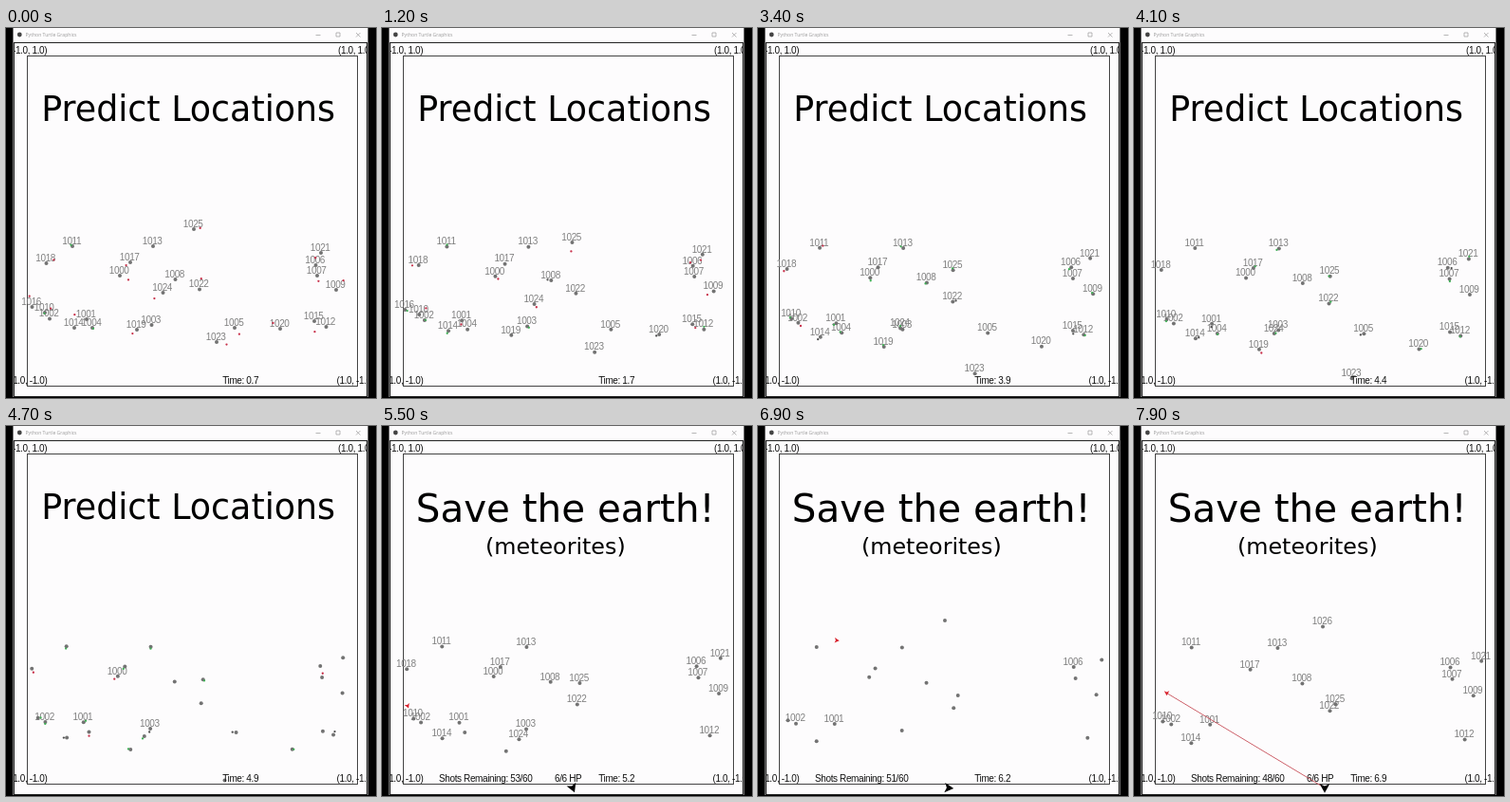
Animation of 390 by 390 pixels, one loop 8 s. Source, as an HTML page:

```html
<!DOCTYPE html>
<html lang="en">
<head>
<meta charset="utf-8">
<title>Turtle meteorites</title>
<style>
html, body { margin: 0; width: 100%; height: 100%; overflow: hidden; background: #000; }
svg { display: block; width: 100vw; height: 100vh; }
text { font: 10px "Liberation Sans", Arial, sans-serif; letter-spacing: -.38px; fill: #111; }
.title text { font-family: "DejaVu Sans", Verdana, sans-serif; letter-spacing: 0; fill: #000; }
.bar text { font: 5.1px "Open Sans", sans-serif; letter-spacing: 0; fill: #999; }
.label { fill: #808080; text-anchor: middle; }
</style>
</head>
<body>
<svg viewBox="0 0 390 390">
  <defs><clipPath id="canvas"><rect x="9" y="15" width="371" height="374"/></clipPath></defs>
  <rect width="390" height="390" fill="#000"/>
  <rect x="7.5" width="374" height="389" fill="#fdfcfd"/>
  <g class="bar">
    <circle cx="14.3" cy="7" r="2.4" fill="#444"/>
    <text x="20.5" y="9">Python Turtle Graphics</text>
    <path d="M326.5 7.5h5M348 5h4v4h-4zM369 5l4.5 4.5M373.5 5l-4.5 4.5" fill="none" stroke="#999" stroke-width=".7"/>
  </g>
  <rect x="8.5" y="15.5" width="372" height="373" fill="none" stroke="#222"/>
  <rect x="22.5" y="29.5" width="348" height="348" fill="none" stroke="#444"/>
  <g clip-path="url(#canvas)">
    <text x="43.2" y="27.2" text-anchor="end">(-1.0, 1.0)</text>
    <text x="350" y="27.2">(1.0, 1.0)</text>
    <text x="43.4" y="375.3" text-anchor="end">(-1.0, -1.0)</text>
    <text x="348.5" y="375.3">(1.0, -1.0)</text>
    <g class="title" id="predict"><text x="37.3" y="97.8" style="font-size:36.4px">Predict Locations</text></g>
    <g class="title" id="save">
      <text x="35.8" y="101.4" style="font-size:40.4px">Save the earth!</text>
      <text x="109" y="135.4" style="font-size:23.8px">(meteorites)</text>
    </g>
    <g id="world"></g>
  </g>
</svg>
<script>
const LOOP = 8000, STEP = 100, SCENE2 = 49, FIRST = 1000;
const T0 = 0.7;              // game time of the first picture
const INTERVAL = 6;          // seconds between launches
const CENTER = [196.5, 203.5];
const GUN = [201, 381.5];
const el = id => document.getElementById(id);

// Where each meteorite is at T0; the launch rule below gives its speed.
const places = [
  [120,261], [85,307], [46,306.5], [153.5,313], [91,316], [241,316], [326.5,250], [328,261], [178.5,265],
  [348,276], [41,300], [70,230], [337.5,315], [155,230], [72,316], [325,309], [27.5,294], [131,247],
  [42.5,248], [138,318], [289,317], [332,237], [204,275.5], [222,331], [165.5,279], [198,212], [181,155]
];
const shotEarlier = [1005, 1015, 1020, 1023];
const targets = [1019, 1004, 1024, 1003, 1000];

// Each key: step, then the values reached there.
const clock = [[0, 0.7], [4, 0.7], [23, 3.22], [47, 4.92], [55, 5.22], [79, 6.92]];
const aim = [[49, 234, 330, 0], [55, 27, 295, 68], [69, 83, 226, 365], [79, 34.5, 281.5, 450]];

const clamp = v => Math.min(1, Math.max(0, v));

function rand(a, b) {
  const v = Math.sin(a * 127.1 + b * 311.7 + 7.3) * 43758.5453;
  return v - Math.floor(v);
}

function track(keys, s) {
  let i = 0;
  while (i < keys.length - 2 && s >= keys[i + 1][0]) i++;
  const a = keys[i], b = keys[i + 1];
  const k = clamp((s - a[0]) / (b[0] - a[0]));
  return a.slice(1).map((v, j) => v + (b[j + 1] - v) * k);
}

const dot = (x, y, r, fill) => `<circle cx="${x.toFixed(2)}" cy="${y.toFixed(2)}" r="${r}" fill="${fill}"/>`;
const text = (x, y, str, cls = "") => `<text x="${x.toFixed(2)}" y="${y.toFixed(2)}" class="${cls}">${str}</text>`;
const arrow = (x, y, angle, scale, fill) =>
  `<path d="M5 0L-4 -5L-2 0L-4 5Z" fill="${fill}" transform="translate(${x} ${y}) rotate(${angle}) scale(${scale})"/>`;

// Launched from the center at a steady speed; older ones have picked up some fall.
function rock([x0, y0], i, time) {
  const age = 0.65 + INTERVAL * (25 - i), dt = time - T0;
  const fall = 1 + 0.75 * clamp((age - 18) / 18);
  return {
    id: FIRST + i,
    x: x0 + (x0 - CENTER[0]) / age * dt,
    y: y0 + (y0 - CENTER[1]) / age * dt * fall,
    age: age + dt
  };
}

// Step at which a meteorite is removed; its label goes 8 steps earlier.
function hitStep(id) {
  if (shotEarlier.includes(id)) return SCENE2;
  const i = targets.indexOf(id);
  return i < 0 ? Infinity : 57 + 5 * i;
}

// Labels are rewritten in id order; some steps catch them halfway.
const lastLabel = s => s > 4 && s % 11 === 3 ? FIRST + Math.floor((s - 4) / 10.8) : Infinity;

// Guesses scatter around the meteorites and close in: red = far, dark = near, green = good.
function drawGuesses(s, live) {
  const seed = Math.max(s, 4), spread = 3.6 + 12 * clamp(1 - seed / 23);
  return live.filter(({ id }) => rand(seed, id) < 0.7).map(({ id, x, y }) => {
    const far = 1 + spread * rand(seed + 0.3, id), turn = 6.283 * rand(seed + 0.6, id);
    const fill = far > 3.9 ? "#c8304a" : far > 3.2 ? "#4d4d4d" : "#3fae55";
    return dot(x + far * Math.cos(turn), y + far * Math.sin(turn), 1.15, fill);
  }).join("");
}

const shotsLeft = s => 53 - Math.floor((s - 55) * 5 / 24);

function drawDefence(s, showHp) {
  const [x, y, angle] = track(aim, s);
  let out = text(60, 375.3, `Shots Remaining: ${shotsLeft(s)}/60`);
  if (showHp) out += text(182, 375.3, "6/6 HP");
  if (s > 55 && shotsLeft(s) < shotsLeft(s - 1)) out += `<path d="M${GUN}L${x} ${y}" stroke="#c8505a" stroke-width=".9"/>`;
  return out + arrow(x, y, angle, 0.55, "#d8202c") + arrow(...GUN, angle, 1.05, "#000");
}

function draw(s) {
  const [time] = track(clock, s);
  const last = lastLabel(s), saving = s >= SCENE2;
  const live = places.map((p, i) => rock(p, i, time))
    .filter(({ id, x, age }) => x > 23 && age > 0 && s < hitStep(id));
  el("predict").style.display = saving ? "none" : "";
  el("save").style.display = saving ? "" : "none";
  let out = "";
  for (const { id, x, y } of live) {
    const hit = saving && s >= hitStep(id) - 8;
    out += dot(x, y, 2, "#737373");
    if (id <= last && !hit) out += text(x - 0.8, y - 2.2, id, "label");
  }
  out += saving ? drawDefence(s, last === Infinity) : drawGuesses(s, live);
  out += text(228.2, 375.3, `Time: ${(Math.floor(time * 10 + 1e-6) / 10).toFixed(1)}`);
  el("world").innerHTML = out;
}

let shown = -1;
function tick() {
  const s = Math.floor((performance.now() % LOOP) / STEP);
  if (s !== shown) draw(shown = s);
  requestAnimationFrame(tick);
}
tick();
</script>
</body>
</html>
```
